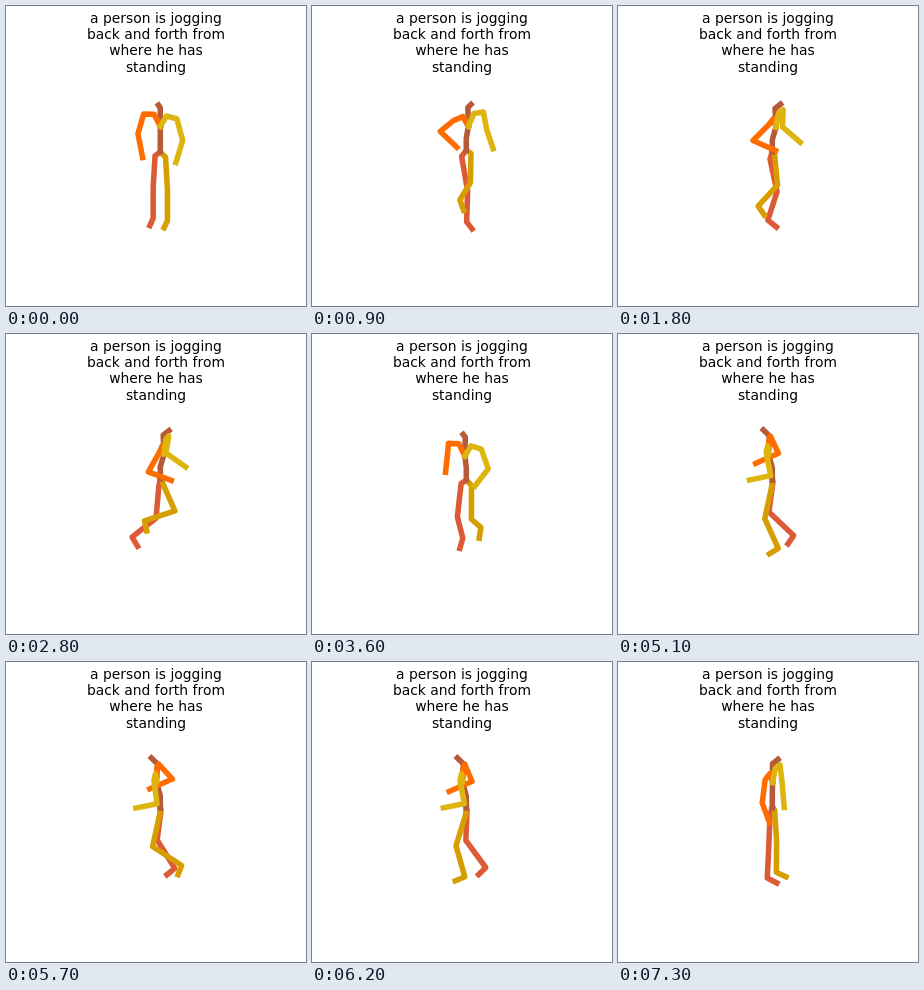
These frames come from a looping animation (300 px wide and 300 px high, 7400 ms). An HTML page:

```html
<!DOCTYPE html>
<html lang="en">
<head>
<meta charset="utf-8">
<title>Jogging figure</title>
<style>
  html, body { margin: 0; width: 100%; height: 100%; overflow: hidden; background: #fff; }
  svg { display: block; width: 100vw; height: 100vh; }
  text { font: 13.89px "DejaVu Sans", sans-serif; font-kerning: none; text-anchor: middle; }
  polyline { fill: none; stroke-width: 5.56; stroke-linecap: square; stroke-linejoin: round; }
</style>
</head>
<body>
<svg viewBox="0 0 300 300">
  <text x="150" y="17">a person is jogging</text>
  <text x="150" y="33">back and forth from</text>
  <text x="150" y="49">where he has</text>
  <text x="150" y="66">standing</text>
</svg>
<script>
const STEP = 0.1, STEPS = 74, TAU = 2 * Math.PI;
const radians = degrees => degrees * TAU / 360;
const lerp = (a, b, k) => a + (b - a) * k;
const smooth = k => k * k * (3 - 2 * k);
const clamp = k => Math.max(0, Math.min(1, k));

// Facing direction: [seconds, degrees]; 0 faces the viewer, 90 faces right.
const turns = [[0, -18], [1.6, 65], [2.9, 75], [4.2, -96], [6.3, -98], [7.3, -45]];

function heading(t) {
  const next = Math.max(1, turns.findIndex(([time]) => time >= t));
  const [t0, a] = turns[next - 1], [t1, b] = turns[next];
  return radians(lerp(a, b, smooth(clamp((t - t0) / (t1 - t0)))));
}

// Left-leg cycles, slowing a little over the run; whole numbers are toe-off.
const stride = t => 1.38 * t - 0.045 * t * t - 2.235;

// 0 while standing, 1 in full run.
const runEffort = t => smooth(clamp(Math.min(t / 0.7, (7.4 - t) / 0.6)));

// Body points are [forward, right, up] from the pelvis.
// Each bone is [length, degrees swung forward, shift to the right].
function chain(start, bones) {
  const points = [start];
  for (const [length, degrees, shift] of bones) {
    const [forward, right, up] = points.at(-1), angle = radians(degrees);
    points.push([forward + length * Math.sin(angle), right + shift, up - length * Math.cos(angle)]);
  }
  return points;
}

function leg(side, phase, effort) {
  const lift = Math.sin(TAU * phase) ** 3;
  const thigh = effort * (9 + 18 * Math.cos(TAU * (phase - 0.4)));
  const bend = effort * (28 + (lift > 0 ? 60 : -14) * lift);
  const shin = thigh - bend;
  const hip = [0, 5.5 * side, -5];
  return [[0, 0, 0], ...chain(hip, [[35, thigh, 2 * side], [35, shin, 0], [11, shin + 76, 0]])];
}

function arm(side, phase, effort, chest, rest, swing) {
  const upper = effort * (rest - swing * Math.cos(TAU * phase));
  const fore = lerp(8, 67, effort);
  const shoulder = [chest[0], 17.5 * side, 39.5];
  return [chest, [chest[0], 6.5 * side, 41],
    ...chain(shoulder, [[23, upper, 6 * side], [24, fore, -6 * side]])];
}

function figure(t) {
  const phase = stride(t), effort = runEffort(t);
  const chest = [4 * effort, 0, 28.5];
  const spine = [[0, 0, 0], [0, 0, 13.5], chest, [3 * effort, 0, 49], [3 * effort + 6, 0, 55]];
  return [
    leg(1, phase + 0.5, effort),
    leg(-1, phase, effort),
    spine,
    arm(1, phase, effort, chest, -28, 14),
    arm(-1, phase + 0.5, effort, chest, -11, 3)
  ];
}

// View from slightly above: nearer points sit lower.
function projector(t) {
  const s = Math.sin(heading(t)), c = Math.cos(heading(t));
  const rise = 4 * runEffort(t) * Math.max(0, Math.cos(2 * TAU * (stride(t) - 0.38)));
  return ([forward, right, up]) => {
    const near = c * forward + s * right;
    const x = 154.3 + s * forward - c * right;
    const y = 146 - rise - 0.9 * up + 0.47 * near;
    return `${x.toFixed(2)},${y.toFixed(2)}`;
  };
}

const svg = document.querySelector("svg");
const lines = ["#DD5A37", "#D69E00", "#B75A39", "#FF6D00", "#DDB50E"].map(color => {
  const line = document.createElementNS(svg.namespaceURI, "polyline");
  line.setAttribute("stroke", color);
  return svg.appendChild(line);
});

function draw() {
  const t = Math.floor(performance.now() / 1000 / STEP) % STEPS * STEP;
  const project = projector(t);
  figure(t).forEach((points, i) => lines[i].setAttribute("points", points.map(project).join(" ")));
  requestAnimationFrame(draw);
}
draw();
</script>
</body>
</html>
```
